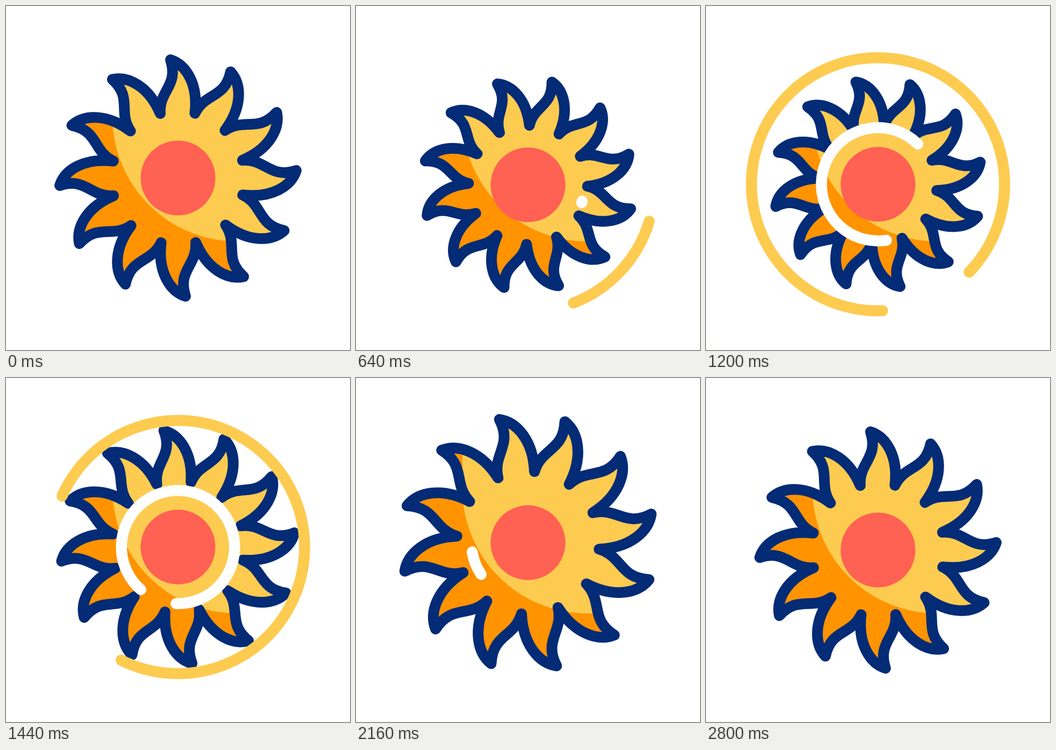
Recreate the animation shown at these times as an HTML page with a canvas. Size 640 by 640 pixels, loop 3000 ms.

```html
<!DOCTYPE html>
<html lang="en">
<head>
<meta charset="utf-8">
<title>Spinning sun</title>
<style>
  html, body { margin: 0; width: 100%; height: 100%; overflow: hidden; background: #fff; }
  canvas { display: block; width: 640px; height: 640px; }
</style>
</head>
<body>
<canvas id="stage" width="640" height="640"></canvas>
<script>
const ctx = document.getElementById('stage').getContext('2d');
const NAVY = '#032b76', YELLOW = '#fdcb50', ORANGE = '#ff9300', RED = '#ff6152', WHITE = '#fff';
const LOOP = 3000, MOVE = 2800, STEP = 40, TAU = Math.PI * 2;
const CROUCH = 1000, PEAK = 1835;

// Easing curve with handles (x1, 0) and (x2, 1), solved by bisection.
const ease = (x1, x2) => u => {
  if (u <= 0) return 0;
  if (u >= 1) return 1;
  let lo = 0, hi = 1, s;
  for (let i = 0; i < 24; i++) {
    s = (lo + hi) / 2;
    const q = 1 - s;
    if (3 * q * q * s * x1 + 3 * q * s * s * x2 + s * s * s < u) lo = s; else hi = s;
  }
  return s * s * (3 - 2 * s);
};
const smooth = ease(1 / 3, 2 / 3);
const spin = ease(0.516, 0.346);
const settleY = ease(0.17, 0.45);
const settleSize = ease(0.26, 0.45);

// Crouch, jump, settle back.
function bounce(t, rest, low, high, settle) {
  if (t < CROUCH) return rest + (low - rest) * smooth(t / CROUCH);
  if (t < PEAK) return low + (high - low) * smooth((t - CROUCH) / (PEAK - CROUCH));
  return high + (rest - high) * settle((t - PEAK) / (MOVE - PEAK));
}

// One ray drawn upwards, repeated twelve times.
const sun = new Path2D();
const ray = [[-33, -120], [-36, -163], [2, -171], [-14, -220], [15.5, -210.5], [38, -174], [31.4, -120.4]];
for (let i = 0; i < 12; i++) {
  const c = Math.cos(i * TAU / 12), s = Math.sin(i * TAU / 12);
  const p = ray.map(([x, y]) => [x * c - y * s, x * s + y * c]);
  if (i === 0) sun.moveTo(...p[0]);
  sun.bezierCurveTo(...p[1], ...p[2], ...p[3]);
  sun.bezierCurveTo(...p[4], ...p[5], ...p[6]);
}
sun.closePath();

// The lit area stays fixed on the stage.
const light = new Path2D();
light.moveTo(198, 0);
light.lineTo(198, 206);
light.arc(430, 206, 232, Math.PI, Math.PI / 2, true);
light.lineTo(640, 438);
light.lineTo(640, 0);
light.closePath();

function drawSun(cy, size, angle) {
  const body = new Path2D();
  body.addPath(sun, new DOMMatrix().translate(320, cy).rotate(angle).scale(size));
  ctx.save();
  ctx.clip(body);
  ctx.fillStyle = ORANGE;
  ctx.fillRect(0, 0, 640, 640);
  ctx.fillStyle = YELLOW;
  ctx.fill(light);
  ctx.restore();
  ctx.strokeStyle = NAVY;
  ctx.lineWidth = 20;
  ctx.stroke(body);
  ctx.fillStyle = RED;
  ctx.beginPath();
  ctx.arc(320, cy, 69.5, 0, TAU);
  ctx.fill();
}

// A ring that grows from its tail and is then wiped away.
function drawRing(t, cy, angle, radius, color, grow, wipe) {
  const head = smooth((t - grow) / 1000), tail = smooth((t - wipe) / 1000);
  if (head - tail < 0.0005) return;
  const base = angle * TAU / 360;
  ctx.strokeStyle = color;
  ctx.lineWidth = 20.5;
  ctx.beginPath();
  ctx.arc(320, cy, radius, base + tail * TAU, base + head * TAU);
  ctx.stroke();
}

function draw(now) {
  const t = Math.min(Math.floor((now % LOOP) / STEP) * STEP, MOVE);
  const cy = bounce(t, 320, 338, 294.4, settleY);
  const size = bounce(t, 1, 0.844, 1.114, settleSize);
  const angle = 180 * spin(t / MOVE);
  ctx.fillStyle = WHITE;
  ctx.fillRect(0, 0, 640, 640);
  ctx.lineCap = ctx.lineJoin = 'round';
  drawSun(cy, size, angle);
  drawRing(t, cy, angle, 235.5, YELLOW, 400, 1120);
  drawRing(t, cy, angle, 105.3, WHITE, 600, 1320);
}

const start = performance.now();
function tick() {
  draw(performance.now() - start);
  requestAnimationFrame(tick);
}
tick();
</script>
</body>
</html>
```
